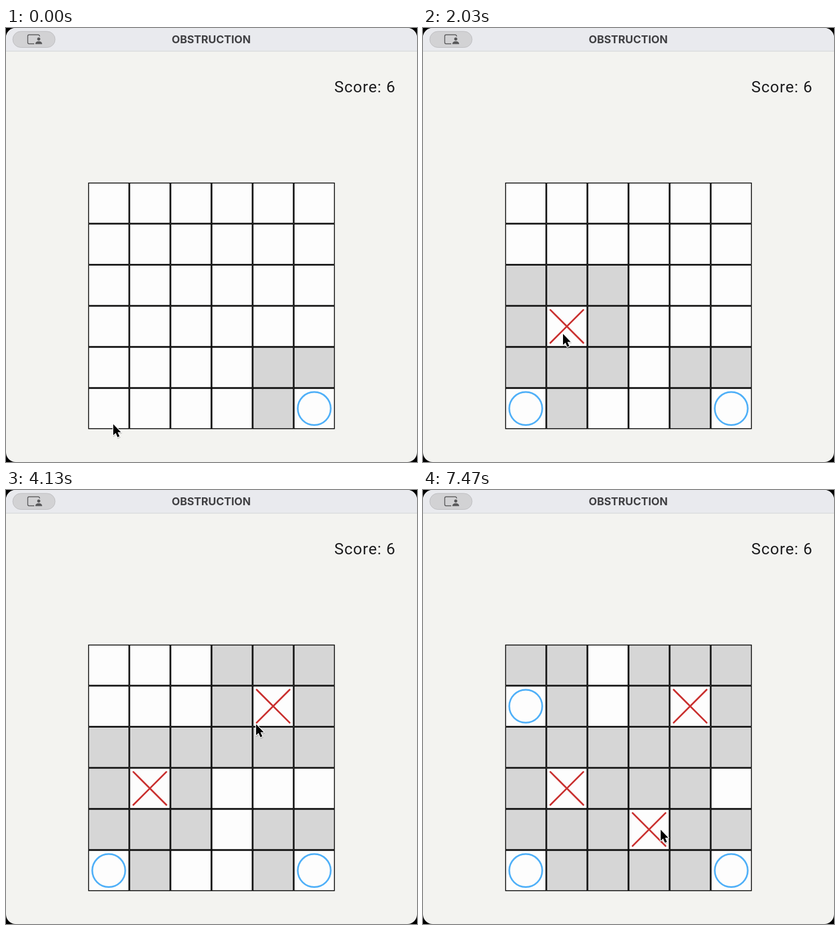
An HTML page that plays this animation: 728 by 769 pixels, repeating every 8 s.

```html
<!DOCTYPE html>
<html lang="en">
<head>
<meta charset="utf-8">
<title>Board game</title>
<style>
  html, body { margin: 0; width: 100%; height: 100%; overflow: hidden; background: #000; }
  svg { display: block; width: 728px; height: 769px; }
  .title { font: 700 19px Inter, sans-serif; fill: #404043; text-anchor: middle; }
  .score { font: 400 28px Roboto, sans-serif; fill: #1c1c1e; letter-spacing: 1px; }
  .cell { stroke: #000; stroke-width: 1.5; }
  .mark { fill: none; stroke-width: 3; stroke-linecap: round; }
  .x { stroke: #c9302f; }
  .o { stroke: #50b0f8; }
</style>
</head>
<body>
<svg viewBox="0 0 728 769">
  <defs>
    <clipPath id="win"><rect width="728" height="769" rx="17"/></clipPath>
  </defs>
  <g clip-path="url(#win)">
    <rect width="728" height="769" fill="#f3f3f0"/>
    <rect width="728" height="41" fill="#e9eaee"/>
    <rect y="40.5" width="728" height="1.2" fill="#d6d7da"/>
    <rect x="12" y="6" width="75" height="28.5" rx="14.25" fill="#d2d2d4" stroke="#bcbcbf"/>
    <g fill="none" stroke="#58585a" stroke-width="1.5">
      <path d="M50 28H41a2.5 2.5 0 0 1-2.500-2.500V14.500a2.500 2.500 0 0 1 2.500-2.500H57a2.500 2.500 0 0 1 2.500 2.500V15"/>
    </g>
    <g fill="#58585a">
      <circle cx="58" cy="19.500" r="2.700"/>
      <path d="M52 28.500C52 25 54.500 23.500 58 23.500S64 25 64 28.500Z"/>
    </g>
    <text class="title" x="363.5" y="26.500">OBSTRUCTION</text>
    <text class="score" x="581.500" y="113.500">Score: 6</text>
    <g id="board"></g>
  </g>
  <g id="cursor">
    <path d="M0 0V19.5L4.400 15.400L7.600 23L11 21.600L7.800 14.200H13.600Z" transform="translate(.6 1.600)"
      fill="#000" stroke="#000" stroke-width="2.500" stroke-linejoin="round" opacity=".16"/>
    <path d="M0 0V19.500L4.400 15.400L7.600 23L11 21.600L7.800 14.200H13.600Z"
      stroke="#fff" stroke-width="2.400" stroke-linejoin="round" paint-order="stroke"/>
  </g>
</svg>
<script>
const LOOP = 8000, N = 6, SIZE = 72.8, LEFT = 145.6, TOP = 273.9;

// time, mark, column, row
const turns = [
  [0, 'o', 5, 5],
  [870, 'x', 1, 3],
  [2030, 'o', 0, 5],
  [4130, 'x', 4, 1],
  [5300, 'o', 0, 1],
  [7470, 'x', 3, 4]
];

// start, end, from x, y, to x, y
const moves = [
  [10, 850, 190, 702, 248, 542],
  [3250, 4110, 248, 542, 443, 415],
  [6610, 7450, 443, 415, 421, 602]
];

const board = document.getElementById('board');
const cursor = document.getElementById('cursor');

function add(tag, attrs) {
  const el = document.createElementNS('http://www.w3.org/2000/svg', tag);
  for (const key in attrs) el.setAttribute(key, attrs[key]);
  return board.appendChild(el);
}

const cells = [];
for (let row = 0; row < N; row++) {
  for (let col = 0; col < N; col++) {
    const el = add('rect', {
      class: 'cell', x: LEFT + col * SIZE + .75, y: TOP + row * SIZE + .75,
      width: SIZE - 1.5, height: SIZE - 1.5
    });
    cells.push({ el, col, row });
  }
}

const marks = turns.map(([, kind, col, row]) => {
  const cx = LEFT + (col + .5) * SIZE, cy = TOP + (row + .5) * SIZE;
  return kind === 'o'
    ? add('circle', { class: 'mark o', cx, cy, r: 29.2 })
    : add('path', {
        class: 'mark x',
        d: `M${cx - 29.2} ${cy - 29.2}l58.4 58.4m0-58.4l-58.4 58.4`
      });
});

function drawBoard(count) {
  const played = turns.slice(0, count);
  for (const { el, col, row } of cells) {
    const taken = played.some(([, , c, r]) => c === col && r === row);
    const near = played.some(([, , c, r]) => Math.abs(c - col) < 2 && Math.abs(r - row) < 2);
    el.setAttribute('fill', near && !taken ? '#d6d6d6' : '#fdfdfd');
  }
  marks.forEach((el, i) => el.setAttribute('visibility', i < count ? 'visible' : 'hidden'));
}

const ease = p => p < .5 ? 4 * p ** 3 : 1 - 4 * (1 - p) ** 3;

function drawCursor(t) {
  const [start, end, x0, y0, x1, y1] = moves.filter(m => m[0] <= t).pop() || moves[0];
  const p = ease(Math.min(1, Math.max(0, (t - start) / (end - start))));
  cursor.setAttribute('transform', `translate(${x0 + (x1 - x0) * p} ${y0 + (y1 - y0) * p})`);
}

let shown = 0;
function draw(now) {
  const t = now % LOOP;
  const count = turns.filter(turn => turn[0] <= t).length;
  if (count !== shown) drawBoard(shown = count);
  drawCursor(t);
}

const began = performance.now();
function tick() {
  draw(performance.now() - began);
  requestAnimationFrame(tick);
}
tick();
</script>
</body>
</html>
```
